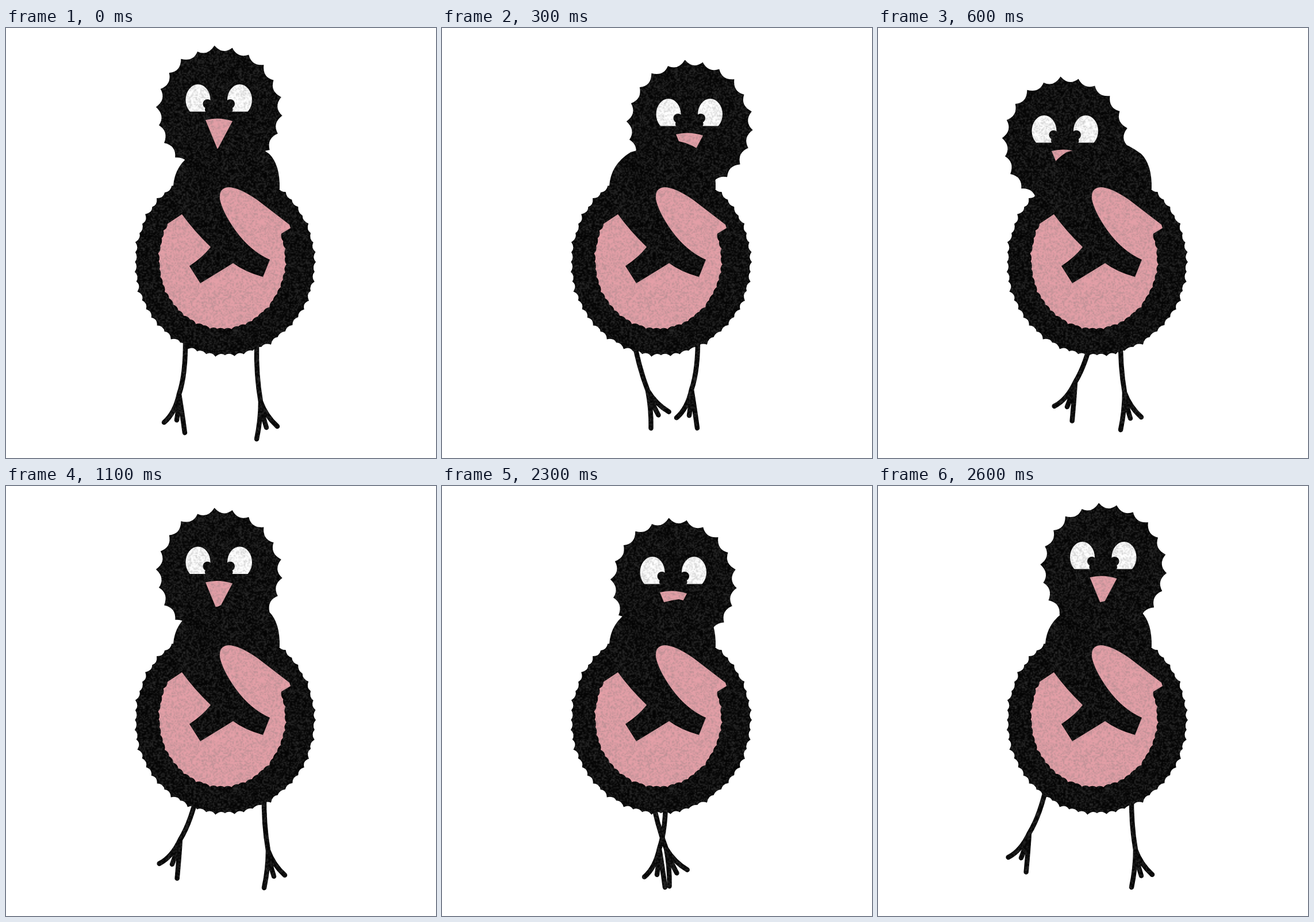
Animation, 748 px wide and 748 px high, one loop 2.7 s. Source, as an HTML page with a canvas:

```html
<!DOCTYPE html>
<html lang="en">
<head>
<meta charset="utf-8">
<title>Dancing bird</title>
<style>
html, body { margin: 0; width: 100%; height: 100%; overflow: hidden; background: #fff; }
canvas { display: block; width: 100%; height: 100%; }
</style>
</head>
<body>
<canvas id="stage" width="748" height="748"></canvas>
<script>
const SIZE = 748, LOOP = 2700;
const BLACK = '#040404', PINK = '#e49fa7', WHITE = '#fff';
const RAD = Math.PI / 180;
const ctx = document.getElementById('stage').getContext('2d');

// Key poses: head offset, then ankle x, y and turn in degrees for each leg
const pose = (head, left, right) => ({ head, left, right });
const tall = pose([0, 0], [301, 637, 0], [443, 650, 0]);
const wide = pose([21.5, -1], [263, 604, 13], [448, 633, 0]);
const crossed = pose([60, 25], [434, 629, 0], [358, 631, -11]);
const tight = pose([32, 25], [378, 631, 0], [390, 631, -11]);
const low = pose([-45, 54], [343, 616, 13], [429, 634, 0]);
const rest = pose([0, 7.5], [303, 615, 13], [456, 634, 0]);

const mid = (a, b) => a.map((v, i) => (v + b[i]) / 2);
const between = (p, q) => pose(mid(p.head, q.head), mid(p.left, q.left), mid(p.right, q.right));
const dance = [tall, wide, between(wide, crossed), crossed, tight, between(tight, low), low];

// The dance runs forward, pauses, then runs backward
function poseAt(t) {
  if (t < 600) return dance[Math.floor(t / 100)];
  if (t < 1100) return low;
  if (t < 2100) return rest;
  return dance[6 - Math.floor((t - 2100) / 100)];
}

function randomizer(seed) {
  return () => {
    seed = (Math.imul(seed, 1664525) + 1013904223) >>> 0;
    return seed / 4294967296;
  };
}

// Adds an elliptic arc of pointed tufts with hollows between them
function tufts(path, cx, cy, rx, ry, from, to, count, depth, jitter) {
  const rand = randomizer(5), step = (to - from) / count;
  const at = (deg, grow) => [
    cx + (rx + grow) * Math.cos(deg * RAD),
    cy + (ry + grow) * Math.sin(deg * RAD)
  ];
  path.lineTo(...at(from, 0));
  for (let i = 1; i <= count; i++) {
    const end = from + i * step;
    const grow = i < count ? (rand() - 0.5) * jitter : 0;
    path.quadraticCurveTo(...at(end - step / 2, -depth), ...at(end, grow));
  }
  path.closePath();
  return path;
}

const head = tufts(new Path2D(), 371, 145, 109, 113, -78, 282, 22, 15, 4);
const body = tufts(new Path2D(), 381, 407, 158, 164, 0, 360, 60, 7, 5);
const neck = new Path2D('M291 275 Q293 238 328 216 Q346 210 368 210 Q386 200 412 197 ' +
  'Q434 201 458 219 Q477 238 476 280 Z');

// The inner edge follows the crossed wings, the rest is the tufted tummy
const belly = new Path2D('M306 324 Q327 353 356 381 Q342 399 319 414 L338 444 ' +
  'Q371 424 395 409 Q415 424 447 433 L459 403 Q425 388 399 352 Q377 321 372 298 ' +
  'Q370 278 387 277 Q405 277 437 299 L493 342 L495 348');
tufts(belly, 376, 403, 111, 121, -22, 211, 36, 4, 3);

const beak = new Path2D('M347 160 Q370 154 394 162 L368 211 Z');
const legLeft = new Path2D('M11 -97 Q12 -35 0 0 Q-7 33 -26 49 M0 8 Q-1 25 -4 45 M0 0 Q5 30 10 67');
const legRight = new Path2D('M-7 -100 Q-8 -45 0 0 Q0 32 -7 65 M2 14 Q5 30 10 45 M0 0 Q9 25 29 43');

function fill(path, color) {
  ctx.fillStyle = color;
  ctx.fill(path);
}

function drawLeg(path, [x, y, deg]) {
  ctx.save();
  ctx.translate(x, y);
  ctx.rotate(deg * RAD);
  ctx.stroke(path);
  ctx.restore();
}

function disc(x, y, rx, ry, color) {
  ctx.fillStyle = color;
  ctx.beginPath();
  ctx.ellipse(x, y, rx, ry, 0, 0, 7);
  ctx.fill();
}

function drawEye(x, side) {
  ctx.save();
  ctx.beginPath();
  ctx.rect(x - 30, 90, 60, 55.5);
  ctx.clip();
  disc(x, 125, 21.5, 27, WHITE);
  disc(x + side * 16.5, 132, 8, 8, BLACK);
  disc(x + side * 20, 142, 8, 8, BLACK);
  ctx.restore();
}

function drawHead([x, y]) {
  ctx.save();
  ctx.translate(x, y);
  fill(head, BLACK);
  drawEye(334, 1);
  drawEye(406.5, -1);
  fill(beak, PINK);
  ctx.restore();
}

// Paper-like speckle that lies over the whole figure
function makeGrain() {
  const tile = document.createElement('canvas'), n = tile.width = tile.height = SIZE / 2;
  const g = tile.getContext('2d'), img = g.createImageData(n, n), rand = randomizer(11);
  for (let i = 0; i < img.data.length; i += 4) {
    img.data.fill(115, i, i + 3);
    img.data[i + 3] = Math.max(0, rand() - 0.4) * 155;
  }
  g.putImageData(img, 0, 0);
  return tile;
}
const grain = makeGrain();

function draw(t) {
  const now = poseAt(t);
  ctx.clearRect(0, 0, SIZE, SIZE);
  ctx.strokeStyle = BLACK;
  ctx.lineWidth = 8.5;
  ctx.lineCap = ctx.lineJoin = 'round';
  drawLeg(legLeft, now.left);
  drawLeg(legRight, now.right);
  drawHead(now.head);
  fill(neck, BLACK);
  fill(body, BLACK);
  fill(belly, PINK);
  ctx.globalCompositeOperation = 'source-atop';
  ctx.drawImage(grain, 0, 0, SIZE, SIZE);
  ctx.globalCompositeOperation = 'source-over';
}

const start = performance.now();
function tick() {
  draw((performance.now() - start) % LOOP);
  requestAnimationFrame(tick);
}
tick();
</script>
</body>
</html>
```
